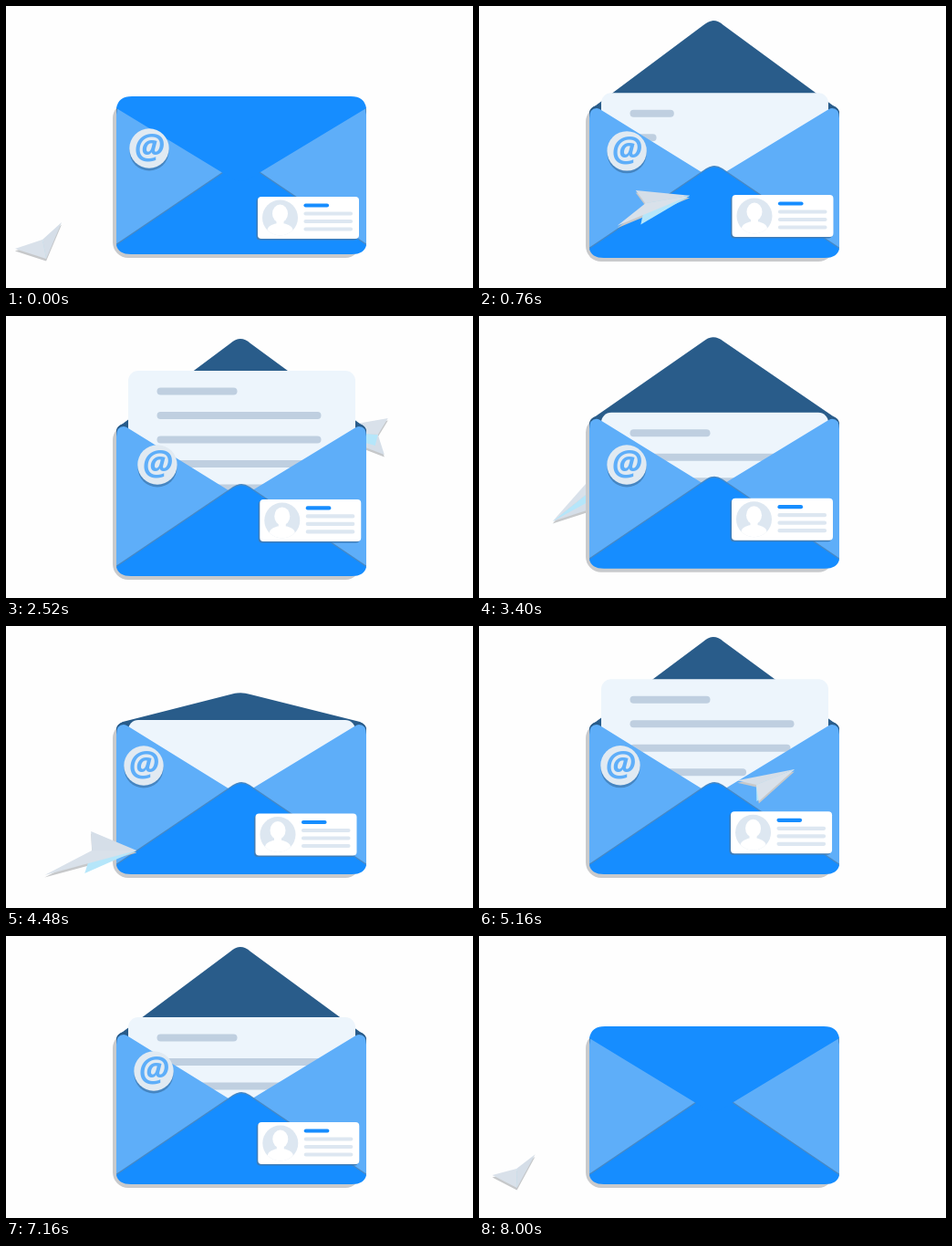
An HTML page for the animation above (8.04 s loop, 512x309 px).

```html
<!DOCTYPE html>
<html lang="en">
<head>
<meta charset="utf-8">
<title>Mail</title>
<style>
  html, body { margin: 0; width: 100%; height: 100%; overflow: hidden; background: #fefefe; }
  svg { display: block; width: 100%; height: 100%; }
  .rule { fill: none; stroke: #bfcfe0; stroke-width: 8; stroke-linecap: round; }
  .info { fill: none; stroke: #dde7f1; stroke-width: 4.2; stroke-linecap: round; }
  .at { font: italic 700 38px "Open Sans", "Noto Sans", sans-serif; fill: #5eaef9; text-anchor: middle; }
</style>
</head>
<body>
<svg viewBox="0 0 512 309">
  <defs>
    <clipPath id="face"><circle cx="24.5" cy="23" r="19.5"/></clipPath>
    <path id="front" d="M121 262L249 175.500Q258 169.500 267 175.500L395 262Q393 272 379 272H137Q123 272 121 262Z"/>
    <g id="plane">
      <path class="shade" fill="#c6c8ca" transform="translate(0 2.500)"/>
      <path class="wing" fill="#d5dee8"/>
      <path class="keel" fill="#b5e6fa"/>
      <path class="wing" fill="#d9e1ea"/>
    </g>
  </defs>

  <use id="planeBack" href="#plane"/>
  <g id="envelope">
    <rect x="117" y="106" width="272" height="170" rx="17" fill="#c9cacc"/>
    <path d="M121 130V116Q121 105 132 105H384Q395 105 395 116V260H121Z" fill="#295c8a"/>
    <path id="flapOpen" fill="#295c8a"/>
    <g id="letter">
      <rect x="134" width="249" height="150" rx="11" fill="#edf5fc"/>
      <g id="rules"></g>
    </g>
    <path d="M121 262V119Q121 108 129 108Q131 108 134 110L257 186V200Z" fill="#5eaef9"/>
    <path d="M395 262V119Q395 108 387 108Q385 108 382 110L257 186V200Z" fill="#5eaef9"/>
    <use href="#front" fill="#4788c4" y="-1.500"/>
    <use href="#front" fill="#168dff"/>
    <path id="flapShut" fill="#168dff"/>
  </g>

  <g id="badge">
    <circle cy="3" r="21.500" fill="#4686c2"/>
    <circle r="21.700" fill="#e1eaf2"/>
    <text class="at" y="11">@</text>
  </g>

  <g id="card">
    <rect x="-1.500" y="1.500" width="111" height="46" rx="4" fill="#3f7db8"/>
    <rect width="111" height="46" rx="4" fill="#fff"/>
    <circle cx="24.5" cy="23" r="19.500" fill="#dde7f1"/>
    <g clip-path="url(#face)" fill="#fff">
      <ellipse cx="24.5" cy="18.500" rx="8.500" ry="10"/>
      <rect x="20.500" y="24" width="8" height="8"/>
      <ellipse cx="24.500" cy="37" rx="14" ry="8"/>
    </g>
    <path class="info" d="M52.500 18.500H102M52.500 27H102M52.500 35.500H102"/>
    <path class="info" d="M52.500 9.500H76" style="stroke:#168dff"/>
  </g>
  <use id="planeFront" href="#plane"/>
</svg>

<script>
const LOOP = 8040, CYCLE = LOOP / 2;
const $ = id => document.getElementById(id);
const clamp = x => Math.min(1, Math.max(0, x));
const ease = (t, a, b) => (1 - Math.cos(Math.PI * clamp((t - a) / (b - a)))) / 2;

// Smooth closed curve through rows of [time, ...values].
function follow(rows, t, period) {
  const n = rows.length;
  const at = i => {
    const turn = Math.floor(i / n), row = rows[i - turn * n];
    return [row[0] + turn * period, ...row.slice(1)];
  };
  let i = n - 1;
  while (rows[i][0] > t) i--;
  const [p, a, b, q] = [at(i - 1), at(i), at(i + 1), at(i + 2)];
  const d = b[0] - a[0], u = (t - a[0]) / d;
  return a.slice(1).map((v, j) => {
    const k = j + 1;
    const m0 = (b[k] - p[k]) / (b[0] - p[0]) * d;
    const m1 = (q[k] - a[k]) / (q[0] - a[0]) * d;
    return v + u * (m0 + u * (3 * (b[k] - v) - 2 * m0 - m1 + u * (2 * (v - b[k]) + m0 + m1)));
  });
}

// time, then nose, left wing, right wing, tail notch, keel
const flight = [
  [0,    44, 277,  61, 237,  10, 266,  40, 256,  37, 260],
  [150,  66, 276,  66, 231,   5, 270,  48, 254,  45, 268],
  [460, 143, 246,  93, 225,  42, 273,  94, 246,  86, 271],
  [1520, 440, 112, 381, 139, 442, 142, 411, 133, 416, 147],
  [1980, 445, 87, 421, 118, 490, 79, 458, 93, 463, 109],
  [2520, 345, 125, 415, 152, 419, 112, 408, 130, 405, 142],
  [3400, 81, 225, 165, 198, 150, 147, 150, 170, 145, 190],
  [3620, 33, 260, 78, 258, 70, 214, 66, 236, 60, 246]
];
const badgePath = [
  [0, 157, 156], [1520, 167, 160.5], [3400, 162, 163],
  [4480, 151, 153], [6000, 162, 153.5], [7160, 162, 148]
];
const cardPath = [
  [0, 276, 209], [1520, 278.7, 204], [3400, 277, 199.7],
  [4480, 273.5, 205.5], [6000, 279.5, 200], [7160, 276.3, 204]
];

const rules = Array.from({ length: 5 }, (_, i) => {
  const line = document.createElementNS("http://www.w3.org/2000/svg", "path");
  line.setAttribute("class", "rule");
  $("rules").append(line);
  return { line, y: 22.5 + i * 26.5, width: i ? 172 : 80 };
});
const [farWing, nearWing] = document.querySelectorAll(".wing");
const keelPath = document.querySelector(".keel"), shade = document.querySelector(".shade");

const place = (el, x, y) => el.setAttribute("transform", `translate(${x} ${y})`);
const show = (el, on) => el.setAttribute("visibility", on ? "visible" : "hidden");
const poly = (...pts) => "M" + pts.map(p => p.join(" ")).join("L") + "Z";

function drawFlap(open) {
  const tip = 191 - 179 * open, up = tip < 105;
  show($("flapOpen"), up);
  show($("flapShut"), !up);
  if (up) {
    const k = (105 - tip) / 93, side = 105 - 88 * k;
    $("flapOpen").setAttribute("d",
      `M121 122V113Q121 108 128 105L246 ${side}Q257 ${105 - 98 * k} 268 ${side}L388 105Q395 108 395 113V122Z`);
  } else {
    const q = (tip - 105) / 86, top = 105 - 6 * q, side = 112 + 76 * q;
    $("flapShut").setAttribute("d",
      `M121 112Q123 ${top} 138 ${top}H378Q393 ${top} 395 112L269 ${side}Q257 ${112 + 84 * q} 246 ${side}Z`);
  }
}

function drawLetter(p) {
  place($("letter"), 0, 103 - 61 * (ease(p, 460, 1500) - ease(p, 2290, 3540)));
  rules.forEach(({ line, y, width }, i) => {
    const grow = ease(p, 560 + i * 110, 960 + i * 110);
    show(line, grow > 0);
    line.setAttribute("d", `M169.500 ${y}h${width * grow}`);
  });
}

function drawPlane(p) {
  const v = follow(flight, p, CYCLE);
  const [nose, left, right, notch, keel] = [0, 2, 4, 6, 8].map(i => [v[i], v[i + 1]]);
  farWing.setAttribute("d", poly(nose, left, notch));
  nearWing.setAttribute("d", poly(nose, right, notch));
  keelPath.setAttribute("d", poly(nose, notch, keel));
  shade.setAttribute("d", poly(nose, left, notch) + poly(nose, right, notch));
  const front = p < 2050 || p > 3800;
  show($("planeFront"), front);
  show($("planeBack"), !front);
}

function draw(t) {
  const p = t % CYCLE;
  const bob = t < 4220 ? 7.15 * (1 - Math.cos(2 * Math.PI * t / 4220)) : 0;
  place($("envelope"), 0, bob);
  drawFlap(ease(p, 160, 660) - ease(p, 3340, 3840));
  drawLetter(p);
  drawPlane(p);
  place($("badge"), ...follow(badgePath, t, LOOP));
  place($("card"), ...follow(cardPath, t, LOOP));
  show($("badge"), t < 7980);
  show($("card"), t < 7980);
}

const start = performance.now();
function tick() {
  draw((performance.now() - start) % LOOP);
  requestAnimationFrame(tick);
}
draw(0);
requestAnimationFrame(tick);
</script>
</body>
</html>
```
